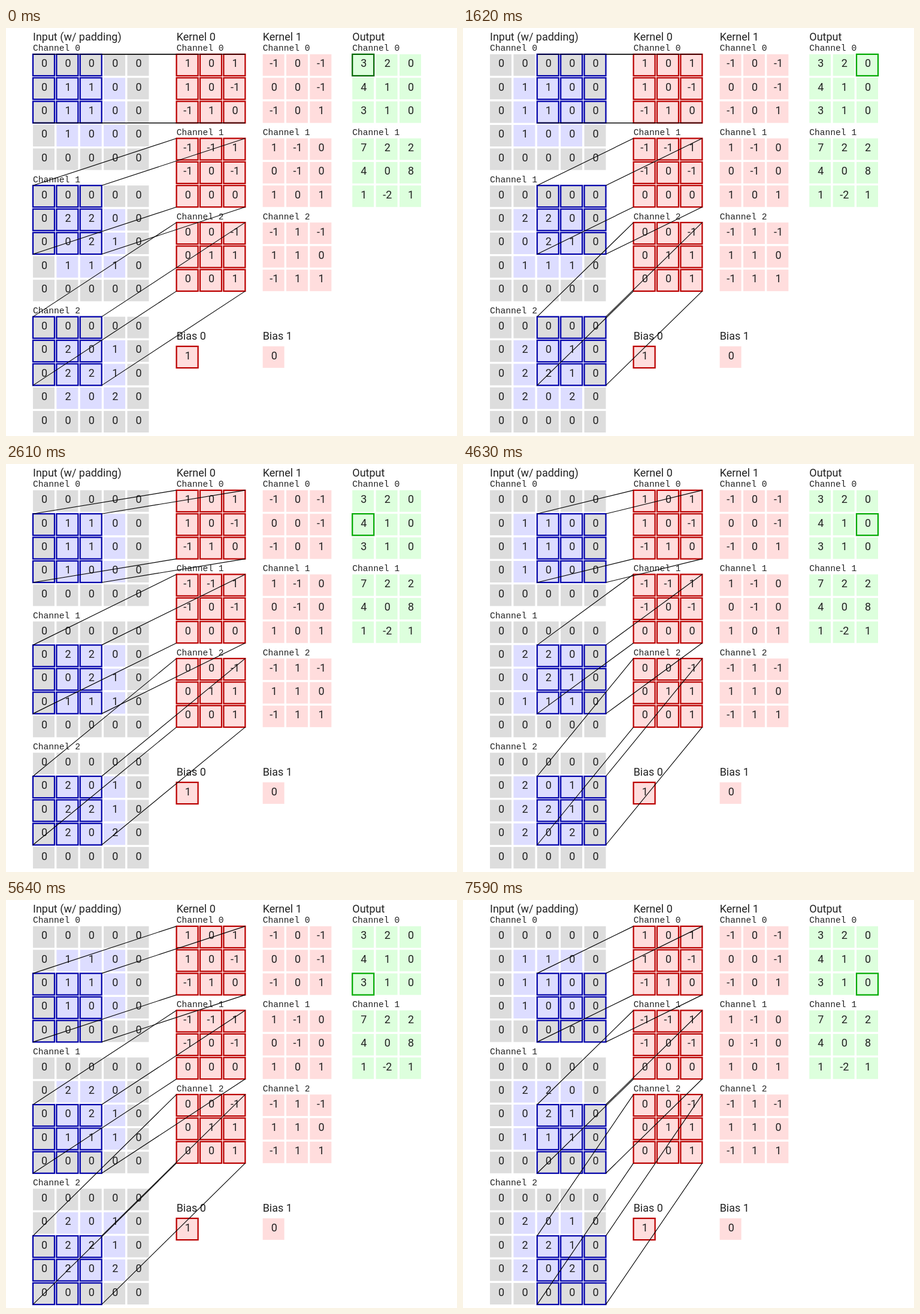
These frames come from a looping animation (753 by 682 pixels, 8 s). An HTML page:

```html
<!DOCTYPE html>
<html lang="en">
<head>
<meta charset="utf-8">
<title>Convolution with padding</title>
<style>
  html, body { margin: 0; width: 100%; height: 100%; overflow: hidden; background: #fff; }
  svg { display: block; width: 753px; height: 682px; }
  text { fill: #222; font: 16px Roboto, Arial, sans-serif; }
  .num { text-anchor: middle; }
  .label { font: 13px "Courier New", "Liberation Mono", monospace; }
  .box { fill: none; stroke-width: 2; }
  .link { stroke: #000; stroke-width: 1; }
</style>
</head>
<body>
<svg viewBox="0 0 753 682"><g id="stage" transform="scale(1.125)"></g></svg>
<script>
// Lengths are in units of 1.125 pixels.
const PITCH = 35, SIZE = 32, SPAN = 2 * PITCH + SIZE;
const TOP = 39, BIAS_Y = 473;
const INPUT_X = 40, KERNEL_0_X = 253, KERNEL_1_X = 381, OUTPUT_X = 514;
const INPUT_GAP = 195, KERNEL_GAP = 125;
const STARTS = [0, 610, 1620, 2610, 3620, 4630, 5640, 6580, 7590];
const LOOP = 8000;

const INPUT = ["1 1 0 1 1 0 1 0 0", "2 2 0 0 2 1 1 1 1", "2 0 1 2 2 1 2 0 2"];
const KERNEL_0 = ["1 0 1 1 0 -1 -1 1 0", "-1 -1 1 -1 0 -1 0 0 0", "0 0 -1 0 1 1 0 0 1"];
const KERNEL_1 = ["-1 0 -1 0 0 -1 -1 0 1", "1 -1 0 0 -1 0 1 0 1", "-1 1 -1 1 1 0 -1 1 1"];
const OUTPUT = ["3 2 0 4 1 0 3 1 0", "7 2 2 4 0 8 1 -2 1"];

const stage = document.getElementById("stage");

function add(tag, attrs, content) {
  const el = document.createElementNS("http://www.w3.org/2000/svg", tag);
  for (const key in attrs) el.setAttribute(key, attrs[key]);
  if (content !== undefined) el.textContent = content;
  stage.appendChild(el);
  return el;
}

function cell(x, y, value, fill) {
  add("rect", { x, y, width: SIZE, height: SIZE, fill });
  add("text", { class: "num", x: x + 17, y: y + 19 }, value);
}

function box(stroke) {
  return add("rect", { class: "box", width: SIZE, height: SIZE, stroke });
}

function place(el, x, y) {
  el.setAttribute("x", x);
  el.setAttribute("y", y);
}

function panel(title, x, gap, data, side, fill) {
  add("text", { x, y: TOP - 20 }, title);
  data.forEach((values, c) => {
    const y = TOP + c * gap, list = values.split(" ");
    add("text", { class: "label", x, y: y - 5 }, "Channel " + c);
    for (let i = 0; i < side * side; i++) {
      const col = i % side, row = Math.floor(i / side);
      const pad = side === 5 && (col % 4 === 0 || row % 4 === 0);
      const value = side === 3 ? list[i] : pad ? 0 : list[(row - 1) * 3 + col - 1];
      cell(x + col * PITCH, y + row * PITCH, value, pad ? "#ddd" : fill);
    }
  });
}

function bias(title, x, value) {
  add("text", { x, y: BIAS_Y - 10 }, title);
  cell(x, BIAS_Y, value, "#fdd");
}

panel("Input (w/ padding)", INPUT_X, INPUT_GAP, INPUT, 5, "#ddf");
panel("Kernel 0", KERNEL_0_X, KERNEL_GAP, KERNEL_0, 3, "#fdd");
panel("Kernel 1", KERNEL_1_X, KERNEL_GAP, KERNEL_1, 3, "#fdd");
panel("Output", OUTPUT_X, KERNEL_GAP, OUTPUT, 3, "#dfd");
bias("Bias 0", KERNEL_0_X, 1);
bias("Bias 1", KERNEL_1_X, 0);
place(box("#b00"), KERNEL_0_X, BIAS_Y);

// Visit the nine cells of a 3x3 window in each channel.
function eachCell(visit) {
  for (let i = 0; i < 27; i++) visit(Math.floor(i / 9), Math.floor(i / 3) % 3, i % 3, i);
}

eachCell((c, r, k) =>
  place(box("#b00"), KERNEL_0_X + k * PITCH, TOP + c * KERNEL_GAP + r * PITCH));
const windows = Array.from({ length: 27 }, () => box("#00a"));
const result = box("#0a0");

// Each window corner is tied to the same corner of its kernel channel.
const links = [];
for (let c = 0; c < 3; c++) {
  for (let corner = 0; corner < 4; corner++) {
    const dx = corner % 2 * SPAN, dy = (corner >> 1) * SPAN;
    const el = add("line", {
      class: "link", x2: KERNEL_0_X + dx, y2: TOP + c * KERNEL_GAP + dy
    });
    links.push({ el, x: INPUT_X + dx, y: TOP + c * INPUT_GAP + dy });
  }
}

function show(step) {
  const dx = step % 3 * PITCH, dy = Math.floor(step / 3) * PITCH;
  eachCell((c, r, k, i) => place(windows[i],
    INPUT_X + dx + k * PITCH, TOP + c * INPUT_GAP + dy + r * PITCH));
  for (const { el, x, y } of links) {
    el.setAttribute("x1", x + dx);
    el.setAttribute("y1", y + dy);
  }
  place(result, OUTPUT_X + dx, TOP + dy);
  result.setAttribute("stroke", step ? "#0a0" : "#060");
}

let current = -1;
const begin = performance.now();

function tick() {
  const time = (performance.now() - begin) % LOOP;
  const step = STARTS.filter(t => t <= time).length - 1;
  if (step !== current) show(current = step);
  requestAnimationFrame(tick);
}
tick();
</script>
</body>
</html>
```
